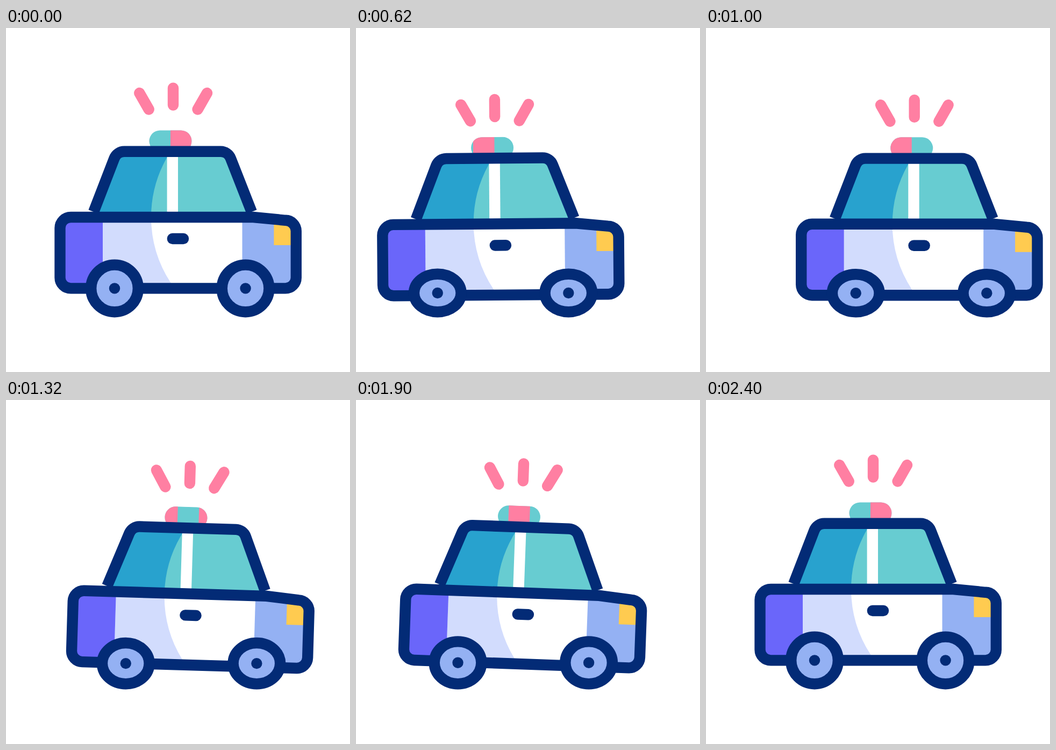
An HTML page that plays this animation: 640 by 640 pixels, repeating every 2420 ms.

```html
<!DOCTYPE html>
<html lang="en">
<head>
<meta charset="utf-8">
<title>Police car</title>
<style>
  html, body { margin: 0; width: 100%; height: 100%; overflow: hidden; background: #fff; }
  svg { display: block; width: 100vw; height: 100vh; }
  .line { fill: none; stroke: #032b76; stroke-width: 20.4; stroke-linecap: round; stroke-linejoin: round; }
</style>
</head>
<body>
<svg viewBox="0 0 640 640">
  <defs>
    <path id="hull" d="M120.5 352H460L520 357.8A20 20 0 0 1 539.8 378V464.4A20 20 0 0 1 519.8 484.4H120.5A20 20 0 0 1 100.5 464.4V372A20 20 0 0 1 120.5 352Z"/>
    <path id="cabin" d="M163 342L201.4 242.6A20 20 0 0 1 220 229.8H399.5A20 20 0 0 1 418 242.6L457 342V352H159Z"/>
    <clipPath id="inHull"><use href="#hull"/></clipPath>
    <clipPath id="inCabin"><use href="#cabin"/></clipPath>
    <clipPath id="inLamp"><rect x="266.5" y="190.5" width="79" height="40" rx="20"/></clipPath>
  </defs>

  <g id="car">
    <g id="beams" stroke="#ff7fa2" stroke-width="20.4" stroke-linecap="round">
      <path d="M248.3 121L265.7 151.4M311 111.6V143.6M374 121L356.6 151.4"/>
    </g>

    <g clip-path="url(#inLamp)">
      <rect x="266" y="190" width="80" height="41" fill="#67ccd1"/>
      <path id="stripes" d="M227 190h39.5v41h-39.5zM306 190h39.5v41h-39.5z" fill="#ff7fa2"/>
    </g>

    <g clip-path="url(#inCabin)">
      <rect x="150" y="225" width="320" height="130" fill="#67ccd1"/>
      <path d="M150 225H309V240H300A224 224 0 0 0 270 352H150Z" fill="#28a2ce"/>
      <rect x="299.6" y="230" width="20.4" height="122" fill="#fff"/>
    </g>

    <g clip-path="url(#inHull)">
      <rect x="100" y="350" width="441" height="136" fill="#fff"/>
      <path d="M180 350H270A224 224 0 0 0 306.5 474L313 486H180Z" fill="#d2dcfd"/>
      <rect x="100" y="350" width="80" height="136" fill="#6a66fa"/>
      <rect x="439.5" y="350" width="102" height="136" fill="#94b1f3"/>
      <rect x="498.4" y="350" width="43" height="54" fill="#ffcb50"/>
    </g>

    <path class="line" d="M163 342L201.4 242.6A20 20 0 0 1 220 229.8H399.5A20 20 0 0 1 418 242.6L457 342" style="stroke-linecap:butt"/>
    <use href="#hull" class="line"/>
    <path class="line" d="M309.8 392H330"/>
  </g>

  <g id="wheels">
    <g class="wheel" transform="translate(202)">
      <ellipse class="line" rx="43.8" style="fill:#94b1f3"/>
      <circle r="10.2" fill="#032b76"/>
    </g>
    <g class="wheel" transform="translate(445.6)">
      <ellipse class="line" rx="43.8" style="fill:#94b1f3"/>
      <circle r="10.2" fill="#032b76"/>
    </g>
  </g>
</svg>
<script>
  const LOOP = 2420, END = 2400, STEP = 20, BOUNCE = 200;
  const SHIFT = [[0, 0], [600, -51.2], [1000, 76.7], [1600, -25], [2200, 0], [2400, 0]];
  const TILT = [[0, 0], [400, 3], [800, -3], [1200, 3], [1600, -3], [2000, 3], [2400, 0]];

  // Squash and beam travel alternate every bounce; the beams rest at both ends.
  const SQUASH = [], BEAM = [];
  for (let i = 0; i <= END / BOUNCE; i++) {
    const t = i * BOUNCE;
    SQUASH.push([t, i % 2]);
    BEAM.push([t, t === 0 || t === END ? 0 : i % 2 ? 9.5 : -9.2]);
  }

  const $ = s => document.querySelector(s);
  const car = $('#car'), beams = $('#beams'), stripes = $('#stripes'), wheels = $('#wheels');
  const tyres = document.querySelectorAll('ellipse'), hubs = document.querySelectorAll('.wheel circle');

  const smooth = x => x * x * (3 - 2 * x);

  function at(keys, t) {
    let i = 1;
    while (i < keys.length - 1 && t > keys[i][0]) i++;
    const [t0, a] = keys[i - 1], [t1, b] = keys[i];
    return a + (b - a) * smooth((t - t0) / (t1 - t0));
  }

  function draw(t) {
    const x = at(SHIFT, t), squash = at(SQUASH, t), drop = 8.8 * squash;
    car.setAttribute('transform', `translate(${x} ${12.8 * squash}) rotate(${at(TILT, t)} 309 487)`);
    beams.setAttribute('transform', `translate(0 ${at(BEAM, t)})`);
    stripes.setAttribute('transform', `translate(${79 * (t % 400) / 400})`);
    wheels.setAttribute('transform', `translate(${x} ${484.4 + drop})`);
    tyres.forEach(e => e.setAttribute('ry', 43.8 - drop));
  }

  const start = performance.now();
  function tick() {
    const t = (performance.now() - start) % LOOP;
    draw(Math.min(END, Math.floor(t / STEP) * STEP));
    requestAnimationFrame(tick);
  }
  draw(0);
  requestAnimationFrame(tick);
</script>
</body>
</html>
```
